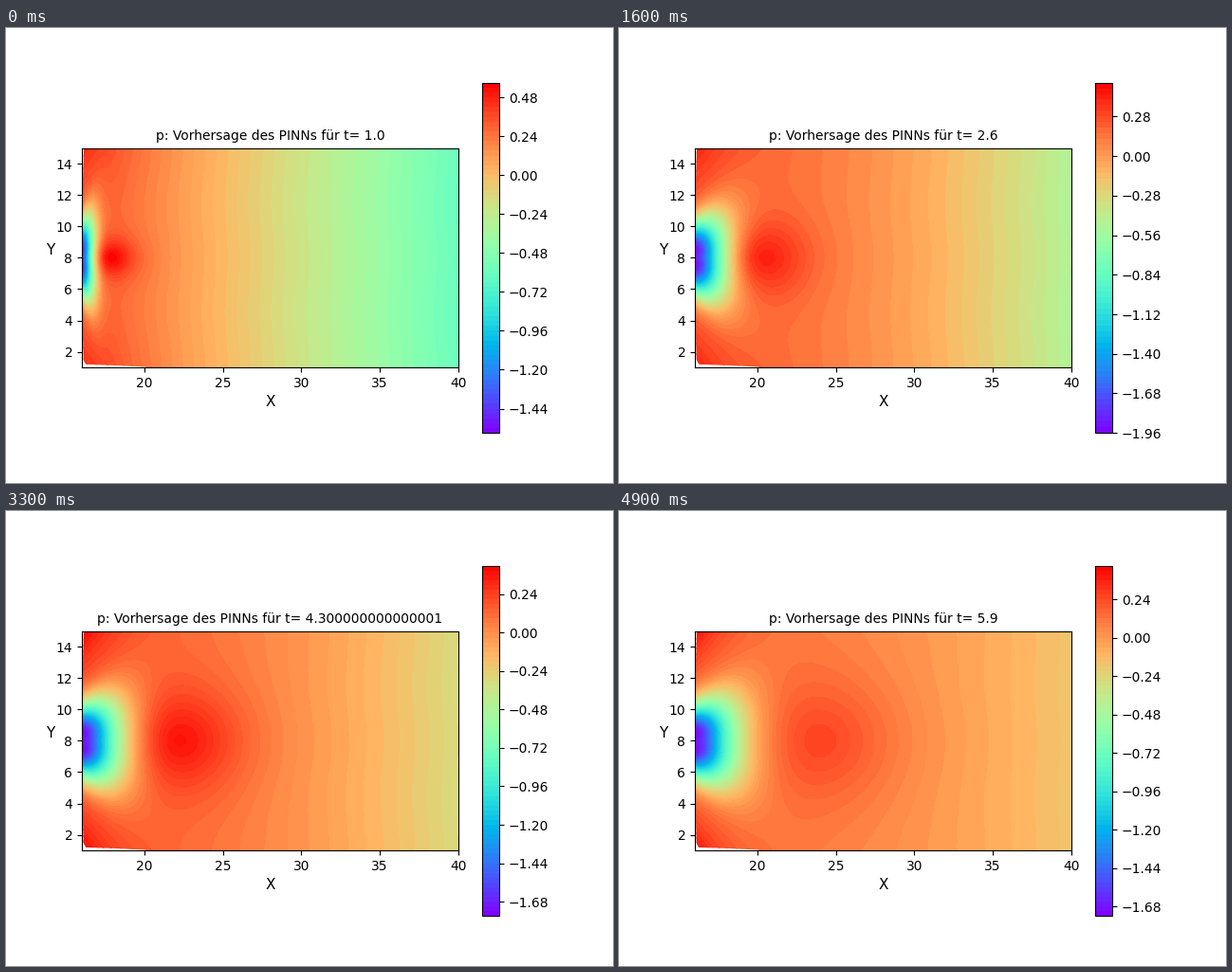
A matplotlib script for the animation above (5 s loop, 640 by 480 pixels).

```python
import numpy as np
import matplotlib.pyplot as plt
from matplotlib.animation import FuncAnimation
from matplotlib.patches import Polygon

FRAMES, INTERVAL = 50, 100
XLIM, YLIM = (16, 40), (1, 15)

x, y = np.meshgrid(16 + 24 * np.linspace(0, 1, 190) ** 1.4,
                   np.linspace(*YLIM, 121))
dx, dy = x - 16, np.abs(y - 8)

# Outline of the sampled region, slightly short of the left corners
HULL = [(16.12, 15), (16, 11), (16, 5), (16.1, 1.5), (16.25, 1.2),
        (18.2, 1.13), (20, 1.04), (20.2, 1), (40, 1), (40, 15)]


def relax(start, end, rate, age):
    """Exponential approach from start to end."""
    return end + (start - end) * np.exp(-rate * age)


def pressure_range(age):
    low = (-1.711 - .27 * np.exp(-((age - .8) / 1.92) ** 2)
           + .363 * np.exp(-5 * age))
    peak = min(.56, .591 - .058 * age)
    corner = .2545 + .034 * age
    return low, max(peak, corner)


def far_field(age, near):
    """Pressure falling from the inflow level towards the right edge."""
    edge = -.6 * np.exp(-(age / 4.2) ** 1.6)
    wavy_x = x - .1 * np.cos(.9 * dy)
    distance = np.clip((wavy_x - 17.5) / 22.5, 0, None)
    return near + (edge - near) * distance ** relax(1, 1.8, 2, age)


def travelling_peak(t):
    offset = x - (16 + 1.65 * t ** .89)
    length = 1.6 * t ** .64 * np.where(offset < 0, .8, 1)
    r = np.hypot(offset / length, dy / (1.15 * t ** .72))
    return (.33 - .01 * (t - 2.2) ** 2) * np.exp(-r ** 1.7)


def wake(age):
    """Unit-depth low at the inflow that widens downstream."""
    along = dx / relax(.8, 2.55, .75, age)
    across = dy / (2.3 * (1 + .5 * along))
    lobes = 1 - .07 * np.exp(-(dy / .5) ** 2 - dx)
    return lobes * np.exp(-along ** 1.6 - across ** 2.5)


def pressure(t, low, high):
    age = t - 1
    near = relax(.31, .06, .4, age)
    corners = relax(.14, .36, .4, age) * np.exp(-dx / 2) * (dy / 7) ** 2.5
    p = (far_field(age, near) + travelling_peak(t) + corners
         - 1.06 * (near - low) * wake(age))
    return np.clip(p, low, high)


def contour_levels(low, high):
    step = .03 if high - low < 2.43 else .04
    return np.arange(np.floor(low / step), np.ceil(high / step) + 1) * step


def draw(i):
    t = 1 + i * 0.1
    low, high = pressure_range(t - 1)
    fig.clear()
    ax = fig.add_subplot()
    filled = ax.contourf(x, y, pressure(t, low, high),
                         levels=contour_levels(low, high), cmap="rainbow")
    filled.set_clip_path(Polygon(HULL, transform=ax.transData))
    fig.colorbar(filled, ax=ax)
    ax.set(xlim=XLIM, ylim=YLIM, aspect="equal")
    ax.set_xlabel("X", fontsize=11)
    ax.set_ylabel("Y", fontsize=11, rotation=0)
    ax.set_title(f"p: Vorhersage des PINNs für t= {t}", fontsize=10)
    return []


fig = plt.figure(figsize=(6.4, 4.8), dpi=100)
anim = FuncAnimation(fig, draw, frames=FRAMES, init_func=lambda: [],
                     interval=INTERVAL, repeat=True, repeat_delay=0)
plt.show()
```
